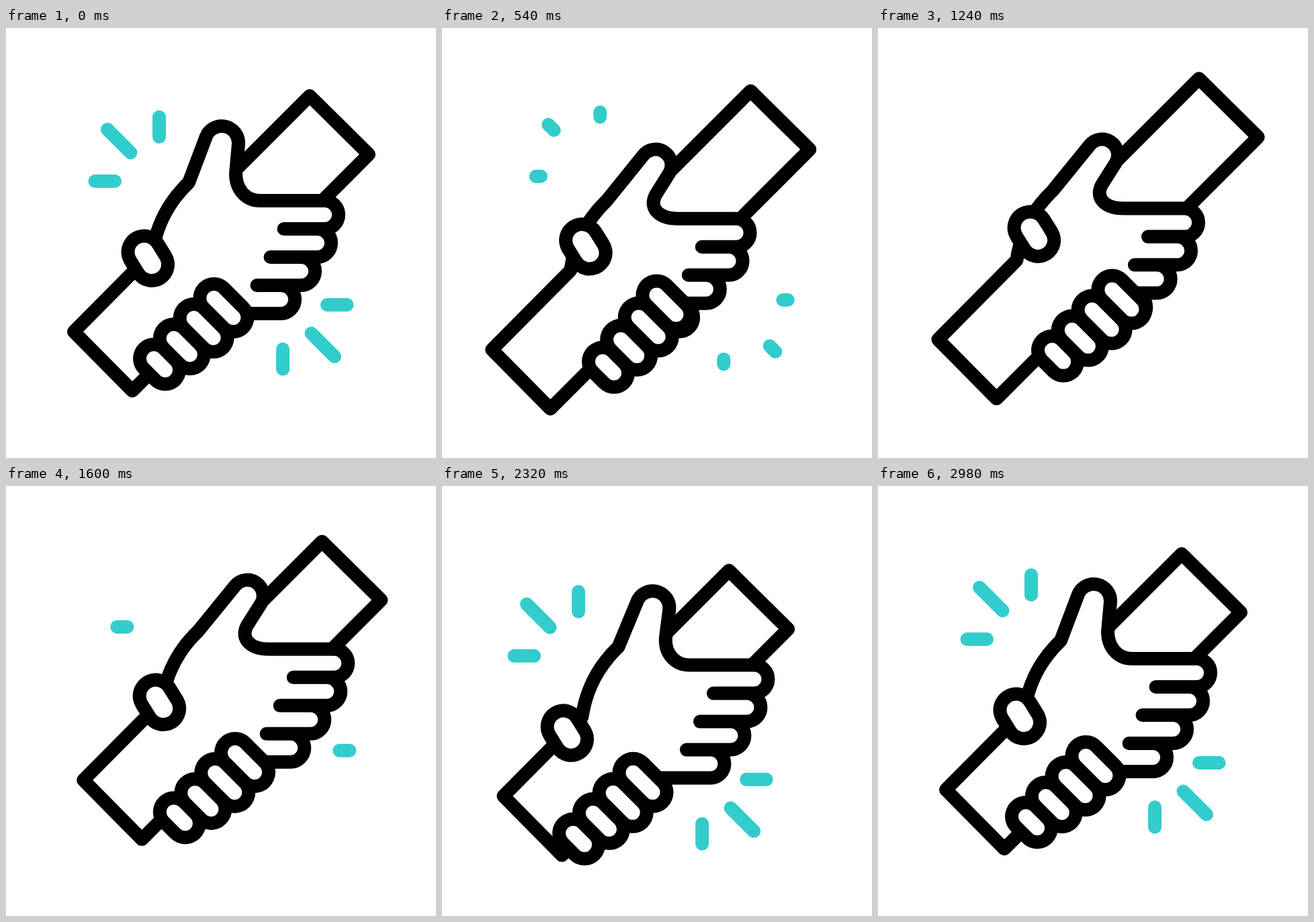
Animation, 640 px wide and 640 px high, one loop 3600 ms. Source, as an HTML page:

```html
<!DOCTYPE html>
<html lang="en">
<head>
<meta charset="utf-8">
<title>Handshake</title>
<style>
  html, body { margin: 0; width: 100%; height: 100%; overflow: hidden; background: #fff; }
  svg { display: block; width: 100vw; height: 100vh; }
</style>
</head>
<body>
<svg viewBox="0 0 640 640" fill="none" stroke="#000" stroke-width="20" stroke-linecap="round" stroke-linejoin="round">
  <g id="rightArm"><path d="M330 223L452 101L540 188L430 298"/></g>
  <g id="leftArm"><path id="hand" fill="#fff"/></g>
  <g id="grip"></g>
  <g id="sparks" stroke="#3cc"></g>
</svg>
<script>
const LOOP = 3600;
const $ = id => document.getElementById(id);
const mix = (a, b, k) => a + (b - a) * k;

// Eased step from 0 to 1 between two times.
function ramp(t, start, end) {
  const k = Math.min(1, Math.max(0, (t - start) / (end - start)));
  return (1 - Math.cos(Math.PI * k)) / 2;
}

// Rises to 1, holds, and falls back to 0.
const pulse = (t, rise, top, fall, end) => ramp(t, rise, top) - ramp(t, fall, end);

function add(parent, tag, attrs = {}) {
  const node = document.createElementNS('http://www.w3.org/2000/svg', tag);
  for (const name in attrs) node.setAttribute(name, attrs[name]);
  return parent.appendChild(node);
}

const move = (node, x, y) => node.setAttribute('transform', `translate(${x} ${y})`);

// Outlined capsule: a wide black line under a narrow white one.
function pill(x, y, dx, dy, inner) {
  const group = add($('grip'), 'g');
  const d = `M${x} ${y}l${dx} ${dy}`;
  add(group, 'path', { d, 'stroke-width': inner + 40 });
  add(group, 'path', { d, 'stroke-width': inner, stroke: '#fff' });
  return group;
}

const knuckles = [];
for (let i = 0; i < 4; i++) {
  const length = Math.min(29, 17 + 7 * i);
  knuckles.push(pill(220 + 29.8 * i, 492 - 30 * i, length, length, 22));
}
const wrist = pill(205.5, 333.5, 11.5, 18.5, 28);

// Three rays fan from flat to upright; a half turn gives the opposite three.
const rays = [0, 1, 2].map(i => {
  const slant = i === 1;
  const length = slant ? 34.5 : 29.5;
  const x = i === 2 ? 228 : slant ? 151 : 132.5;
  const y = i === 0 ? 228 : slant ? 151 : 132.5;
  const nodes = [0, 180].map(turn => add($('sparks'), 'path', { transform: `rotate(${turn} 320 320)` }));
  return { x, y, dx: i < 2 ? length : 0, dy: i > 0 ? length : 0, nodes, regrow: 1420 + 240 * i };
});

function drawRay({ x, y, dx, dy, nodes, regrow }, t) {
  const shrunk = ramp(t, 60, 780), grown = ramp(t, regrow, regrow + 360);
  // The inner end withdraws outwards, then the ray grows out from the inner end.
  const from = shrunk < 1 ? 0 : 1 - grown;
  const size = shrunk < 1 ? 1 - shrunk : grown;
  for (const node of nodes) {
    node.setAttribute('d', `M${x + dx * from} ${y + dy * from}l${dx * size} ${dy * size}`);
    node.setAttribute('display', size > 0.001 ? 'inline' : 'none');
  }
}

function handPath(bend, curl) {
  const at = (x0, y0, x1, y1) => `${mix(x0, x1, bend)} ${mix(y0, y1, bend)} `;
  const cx = mix(321, 345, bend), cy = mix(171, 177.5, bend), r = mix(25, 23.5, bend);
  const onTip = degrees => {
    const a = degrees * Math.PI / 180;
    return `${cx + r * Math.cos(a)} ${cy + r * Math.sin(a)}`;
  };
  const thumb = `L${onTip(mix(198, 218, bend))}A${r} ${r} 0 0 1 ${onTip(mix(365, 391, bend))}` +
    `L${at(342, 217, 347, 218)}C${at(342, 240, 332, 240)}${at(357, 257, 348, 257)}378 257`;
  const fingers = [474, 463, 439, 409].map((tip, i) => {
    const root = i < 3 ? 413.5 - 20 * i : 303;
    return `H${tip - 10 * Math.max(1, i) * curl}a21 21 0 0 1 0 42H${root}`;
  }).join('');
  return `M188 540L101 452L218 334Q227 273 272 230${thumb}${fingers}Z`;
}

function draw(t) {
  const sway = 26 * (pulse(t, 110, 1325, 1325, 2425) - pulse(t, 1325, 2425, 2425, 2985));
  const apart = 38 * pulse(t, 20, 680, 1190, 1890) - 15.3 * pulse(t, 1190, 1890, 2320, 2560);
  const lift = pulse(t, 60, 600, 1200, 1800);

  for (const id of ['rightArm', 'grip', 'sparks']) move($(id), sway, -sway);
  move($('leftArm'), sway - apart, apart - sway);
  $('hand').setAttribute('d', handPath(pulse(t, 60, 580, 1900, 2420), pulse(t, 60, 600, 1060, 1500)));
  move(wrist, -4.7 * lift, -10.5 * lift);
  knuckles.forEach((node, i) => {
    const shut = 150 + 80 * i, open = 1480 + 95 * i;
    const slide = 13.3 * pulse(t, shut, shut + 500, open, open + 500);
    move(node, slide, slide);
  });
  rays.forEach(ray => drawRay(ray, t));
}

function tick(now) {
  draw(now % LOOP);
  requestAnimationFrame(tick);
}
draw(0);
requestAnimationFrame(tick);
</script>
</body>
</html>
```
